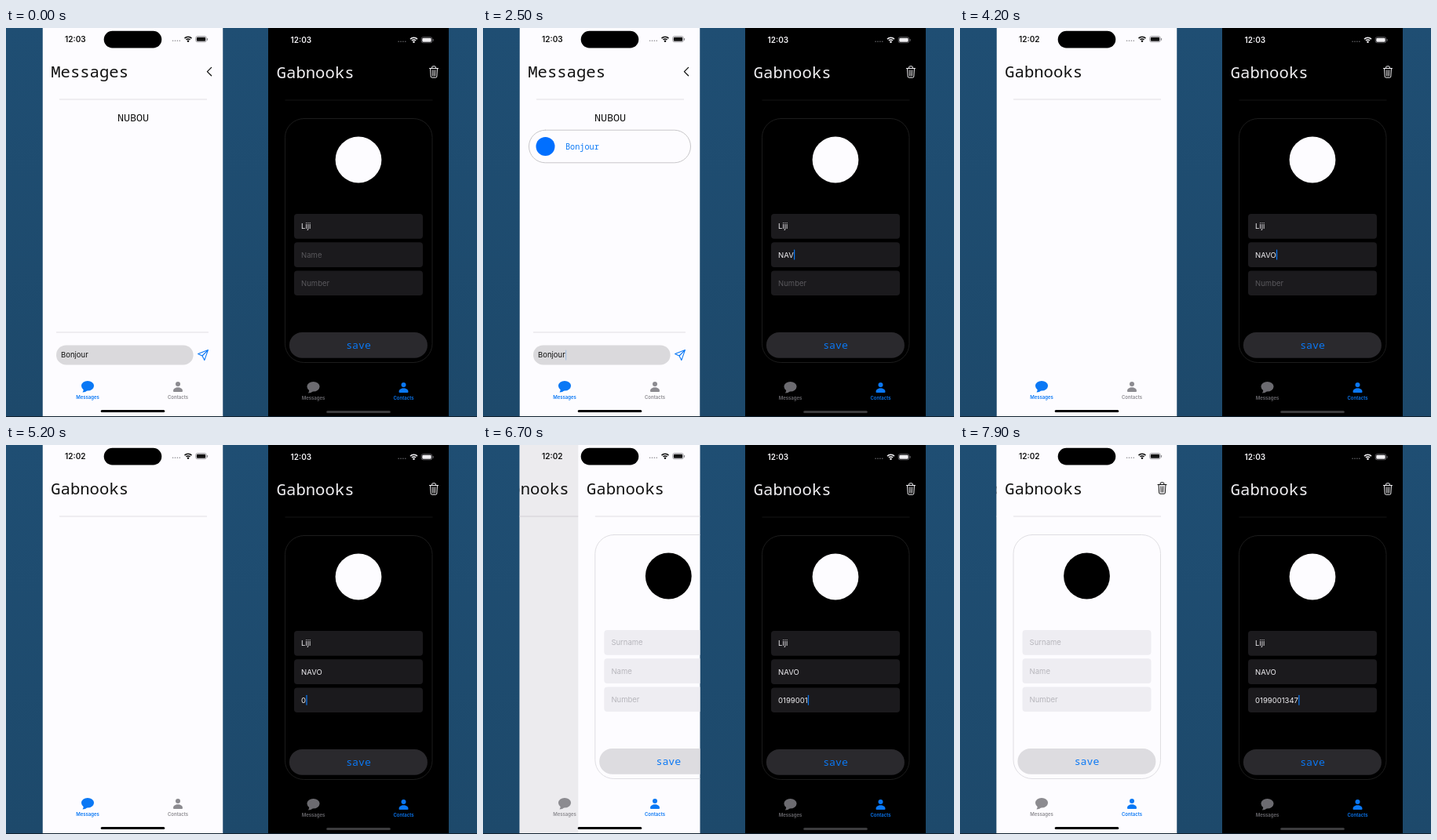
Write an HTML page with a canvas that moves like this. It is 600 px wide and 496 px high and loops after 8 s.

```html
<!DOCTYPE html>
<html lang="en">
<head>
<meta charset="utf-8">
<title>Messaging app, light and dark</title>
<style>
html, body { margin: 0; width: 100%; height: 100%; overflow: hidden; background: #1e4b6e; }
canvas { display: block; width: 600px; height: 496px; }
</style>
</head>
<body>
<canvas id="stage"></canvas>
<script>
const W = 600, H = 496, LOOP = 8000;
const canvas = document.getElementById('stage');
const ctx = canvas.getContext('2d');
const dpr = window.devicePixelRatio || 1;
canvas.width = W * dpr;
canvas.height = H * dpr;

const SANS = 'Inter, Roboto, sans-serif';
const MONO = '"Noto Sans Mono", "DejaVu Sans Mono", monospace';
const BLUE = '#0a78f5';
const LEFT = 46.5, RIGHT = 276.5, WIDTH = 230;

const light = {
  bg: '#fdfcff', ink: '#111', line: '#e1e0e4', card: '#dcdbdf', photo: '#000',
  field: '#eeedf2', hint: '#b7b6bc', button: '#dddce0', idle: '#8c8b90', home: '#000'
};
const dark = {
  bg: '#000', ink: '#f0eff2', line: '#151515', card: '#202020', photo: '#fdfcff',
  field: '#1b1a1d', hint: '#59585c', button: '#2a292d', idle: '#6c6b70', home: '#3c3c3e'
};

const APP = 'Gabnooks', CONTACT = 'NUBOU';
const FIRST = 'Liji', LAST = 'NAVO', PHONE = '0199001347';
const LAST_KEYS = [700, 1500, 2300, 3100];
const PHONE_KEYS = [4900, 5400, 5640, 5890, 6130, 6370, 6610, 6850, 7050, 7500];
const SEND = 100, RECEIVED = 400, CUT = 4000, PUSH = 6583, FOCUS = 4450;

const clamp = v => Math.max(0, Math.min(1, v));

function text(str, x, y, font, color, align = 'left') {
  ctx.font = font;
  ctx.fillStyle = color;
  ctx.textAlign = align;
  ctx.fillText(str, x, y);
}

function box(x, y, w, h, r, fill, stroke, lw = 1) {
  ctx.beginPath();
  ctx.roundRect(x, y, w, h, r);
  if (fill) { ctx.fillStyle = fill; ctx.fill(); }
  if (stroke) { ctx.strokeStyle = stroke; ctx.lineWidth = lw; ctx.stroke(); }
}

function disc(x, y, r, color) {
  ctx.beginPath();
  ctx.arc(x, y, r, 0, 7);
  ctx.fillStyle = color;
  ctx.fill();
}

function path(d, color, lw = 1.1) {
  ctx.strokeStyle = color;
  ctx.lineWidth = lw;
  ctx.lineCap = ctx.lineJoin = 'round';
  ctx.stroke(new Path2D(d));
}

function caret(str, x, y, alpha = 1) {
  if (alpha <= 0) return;
  ctx.font = '9.5px ' + SANS;
  ctx.globalAlpha = alpha;
  box(x + ctx.measureText(str).width + 0.3, y - 10, 1.2, 13, 0.5, BLUE);
  ctx.globalAlpha = 1;
}

function statusBar(c, time) {
  text(time, 75, 17.7, '600 10px ' + SANS, c.ink);
  for (let i = 0; i < 4; i++) disc(212.6 + i * 2.9, 16.2, 0.8, c.idle);
  ctx.strokeStyle = c.ink;
  ctx.lineWidth = 1.6;
  ctx.lineCap = 'butt';
  for (const r of [3.6, 6.3]) {
    ctx.beginPath();
    ctx.arc(232, 17.6, r, -Math.PI * 0.75, -Math.PI * 0.25);
    ctx.stroke();
  }
  disc(232, 16.8, 1.3, c.ink);
  box(241.7, 10.6, 13.6, 7.2, 2.2, null, c.idle, 0.8);
  box(242.8, 11.7, 11.4, 5, 1.3, c.ink);
  box(256, 12.9, 1.1, 2.8, 0.5, c.idle);
}

function tabBar(c, active) {
  const msg = active === 0 ? BLUE : c.idle;
  const who = active === 1 ? BLUE : c.idle;
  ctx.fillStyle = msg;
  ctx.beginPath();
  ctx.ellipse(104, 456.3, 8, 6.3, 0, 0, 7);
  ctx.fill();
  ctx.fill(new Path2D('M98.5 459 Q99.3 462.5 97.5 464.6 Q101.5 464.6 104.5 461.5 Z'));
  disc(219, 454, 3, who);
  ctx.fill(new Path2D('M213 463 C213 456.8 225 456.8 225 463 Q225 464 224 464 H214 Q213 464 213 463 Z'));
  text('Messages', 104, 473, '600 6px ' + SANS, msg, 'center');
  text('Contacts', 219, 473, '600 6px ' + SANS, who, 'center');
  box(120.7, 487, 81.6, 3, 1.5, c.home);
}

function header(c, title) {
  text(title, 57.2, 62.6, '300 20.6px ' + MONO, c.ink);
  ctx.fillStyle = c.line;
  ctx.fillRect(68, 90.5, 188, 1);
}

function trash(c) {
  path('M252 50.5 H263 M255.2 50.3 V48.8 Q255.2 47.8 256.2 47.8 H258.8 Q259.8 47.8 259.8 48.8 V50.3 ' +
    'M253 50.6 L253.7 61 Q253.8 62.2 255 62.2 H260 Q261.2 62.2 261.3 61 L262 50.6', c.ink, 1);
  path('M255.6 52.8 L255.9 60 M257.5 52.8 V60 M259.4 52.8 L259.1 60', c.ink, 0.8);
}

function form(c, values) {
  header(c, APP);
  trash(c);
  box(68, 114.5, 187.5, 311, 24, null, c.card, 0.9);
  disc(161.5, 167, 29.4, c.photo);
  ['Surname', 'Name', 'Number'].forEach((hint, i) => {
    const y = 236 + i * 36.2, v = values[i];
    box(79.5, y, 164, 31.7, 4, c.field);
    text(v || hint, 88.6, y + 19.4, '9.5px ' + SANS, v ? c.ink : c.hint);
  });
  box(73.4, 387, 176, 32.8, 16.4, c.button);
  text('save', 161.5, 408, '13.2px ' + MONO, BLUE, 'center');
}

function chat(t) {
  header(light, 'Messages');
  path('M261.6 50.4 L256.4 55.6 L261.6 60.8', light.ink, 1.3);
  text(CONTACT, 162, 118.6, '500 13.4px ' + MONO, light.ink, 'center');
  if (t >= RECEIVED) {
    box(58.5, 130.2, 206, 41.6, 20.8, null, '#c8c7ca', 1);
    disc(79.5, 151, 12, '#006fff');
    text('Bonjour', 105, 154.6, '500 10.2px ' + MONO, BLUE);
  }
  ctx.fillStyle = light.line;
  ctx.fillRect(64, 387.5, 194, 1);
  box(64, 404.4, 174.6, 25, 12.5, '#dad9dc');
  text('Bonjour', 70, 420.4, '9.5px ' + SANS, light.ink);

  const p = (t - SEND + 900) % 900;
  caret('Bonjour', 70, 420.4, Math.min(clamp((p + 10) / 200), clamp((650 - p) / 200)));

  ctx.globalAlpha = t >= SEND - 40 && t < SEND + 100 ? 0.35 : 1;
  path('M257.4 410.6 L244.6 415.4 L250 418 L252.8 423.6 Z M250 418 L257.4 410.6', BLUE, 1.1);
  ctx.globalAlpha = 1;
}

function page(x, draw) {
  ctx.save();
  ctx.translate(x, 0);
  ctx.fillStyle = light.bg;
  ctx.fillRect(LEFT, 0, WIDTH, H);
  draw();
  ctx.restore();
}

function leftPhone(t) {
  ctx.save();
  ctx.beginPath();
  ctx.rect(LEFT, 0, WIDTH, H);
  ctx.clip();
  const pushed = t >= PUSH;
  if (t < CUT) {
    page(0, () => chat(t));
  } else if (!pushed) {
    page(0, () => header(light, APP));
  } else {
    // Critically damped push with a slower, dimmed page beneath
    const k = 0.0197 * (t - PUSH);
    const rest = (1 + k) * Math.exp(-k);
    page(-0.3 * WIDTH * (1 - rest), () => header(light, APP));
    ctx.fillStyle = `rgba(0,0,0,${0.1 * (1 - rest)})`;
    ctx.fillRect(LEFT, 0, WIDTH, H);
    page(WIDTH * rest, () => form(light, []));
  }
  box(124.7, 3.8, 73.6, 21.6, 10.8, '#000');
  statusBar(light, t < CUT ? '12:03' : '12:02');
  tabBar(light, pushed ? 1 : 0);
  ctx.restore();
}

function rightPhone(t) {
  const typed = (str, keys) => str.slice(0, keys.filter(k => k <= t).length);
  const last = typed(LAST, LAST_KEYS), phone = typed(PHONE, PHONE_KEYS);
  ctx.save();
  ctx.translate(287.5, 0);
  ctx.fillStyle = dark.bg;
  ctx.fillRect(LEFT, 0, WIDTH, H);
  ctx.translate(0, 1);
  form(dark, [FIRST, last, phone]);

  const onPhone = t >= FOCUS;
  const keys = onPhone ? [FOCUS, ...PHONE_KEYS] : LAST_KEYS;
  const since = t - Math.max(-500, ...keys.filter(k => k <= t));
  if (since % 1000 < 500) {
    caret(onPhone ? phone : last, 88.6, onPhone ? 327.8 : 291.6);
  }
  statusBar(dark, '12:03');
  tabBar(dark, 1);
  ctx.restore();
}

const start = performance.now();

function frame() {
  const t = (performance.now() - start) % LOOP;
  ctx.setTransform(dpr, 0, 0, dpr, 0, 0);
  const sky = ctx.createLinearGradient(0, 0, 0, H);
  sky.addColorStop(0, '#1f4e73');
  sky.addColorStop(1, '#1d496b');
  ctx.fillStyle = sky;
  ctx.fillRect(0, 0, W, H);
  leftPhone(t);
  rightPhone(t);
  ctx.fillStyle = '#10212f';
  ctx.fillRect(0, H - 1, W, 1);
  requestAnimationFrame(frame);
}
frame();
</script>
</body>
</html>
```
